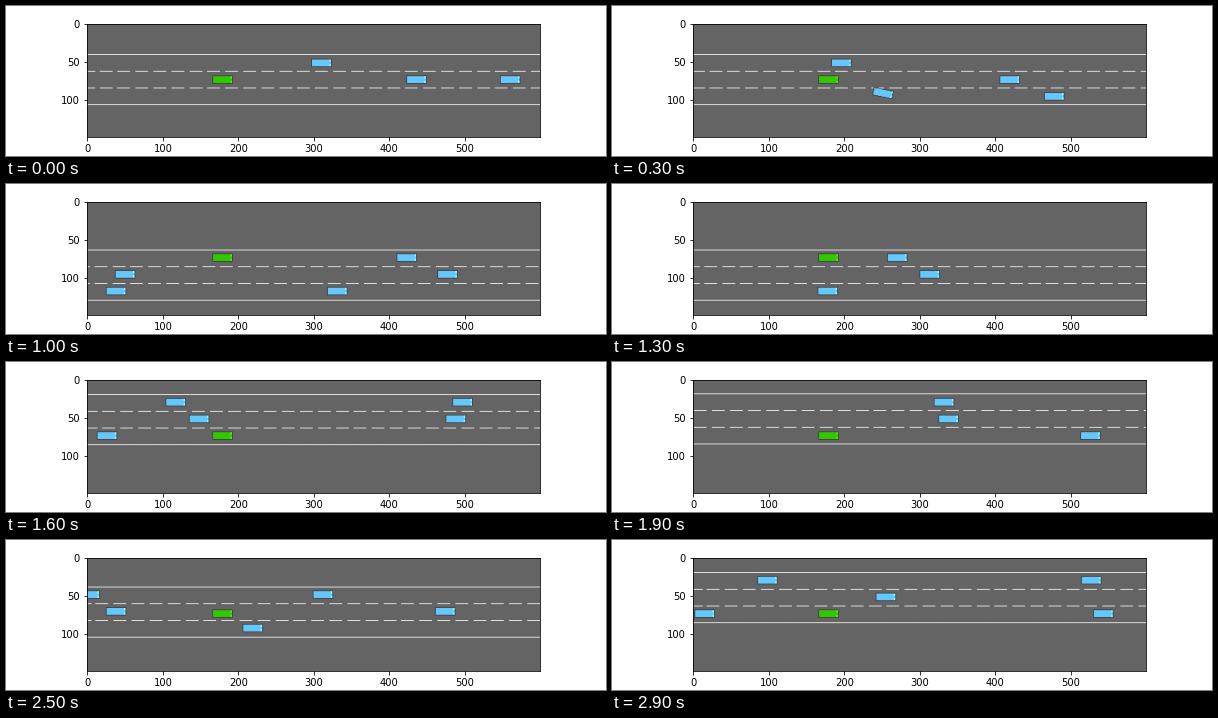
Write a matplotlib script that moves like this. It is 600 px wide and 150 px high and loops after 3000 ms.

```python
import numpy as np
import matplotlib.pyplot as plt
from matplotlib.animation import FuncAnimation

W, H, FRAMES, STEP_MS = 600, 150, 30, 100
SCALE = 5.5                      # road pixels per metre
LANE = 22                        # lane width in road pixels
DASH_GAP, DASH_LEN = 4.33 * SCALE, 16
EGO_X, EGO_Y, EGO_SPEED = 180, 75, 30
GREY, WHITE, EDGE = (100, 100, 100), (255, 255, 255), (60, 60, 60)
GREEN, BLUE = (50, 200, 0), (100, 200, 255)
YY, XX = np.mgrid[0:H, 0:W]

# The green car's lane changes: step and direction
TURNS = [(6, -1), (14, 1), (15, 1), (25, -1), (28, 1)]

# Per lane: step at which a car is passed, and its closing speed
TRAFFIC = [
    [(3.4, 43.6), (14.8, 51), (21.8, 54.9), (27.5, 53.4), (35.7, 52)],
    [(7.56, 52.7), (15.45, 54.7), (22.2, 50), (30.4, 54.8)],
    [(7.77, 62.8), (13, 50.9), (25.8, 51.1), (36, 52)],
]


def ego_lane(t):
    """Each lane change eases out, leaving 12 % of the way per step."""
    return 1 + sum(d * (1 - 0.12 ** (t - s + 1)) for s, d in TURNS if t >= s)


def car_x(passed, speed, t):
    """The last term is the green car still gaining speed at the start."""
    return EGO_X + speed * (passed - t) - 3 * SCALE * np.exp(-t / 0.6)


def paint_car(view, x, y, color, angle=0.0):
    dx, dy = XX - int(x), YY - int(y)
    u = np.rint(dx * np.cos(angle) - dy * np.sin(angle))
    v = np.rint(dx * np.sin(angle) + dy * np.cos(angle))
    body = (u >= -14) & (u <= 12) & (v >= -6) & (v <= 4)
    inner = (u > -14) & (u < 12) & (v > -6) & (v < 4)
    lamps = inner & (u >= 10) & ((v <= -3) | (v >= 1))
    view[body] = EDGE
    view[inner] = color
    view[lamps] = [min(int(c / 0.68), 255) for c in color]


def paint_road(view, row, t):
    view[[row, row + 3 * LANE]] = WHITE
    start = (17 - EGO_SPEED * SCALE * t) % DASH_GAP - DASH_GAP
    for x in np.arange(start, W, DASH_GAP):
        a, b = max(int(x), 0), max(int(x) + DASH_LEN + 1, 0)
        view[[row + LANE, row + 2 * LANE], a:b] = WHITE


def road_view(t):
    view = np.full((H, W, 3), GREY, np.uint8)
    top = 64.1 - 22.15 * ego_lane(t)
    first_lane = top + 11.25
    paint_road(view, int(top), t)

    for lane, cars in enumerate(TRAFFIC):
        for passed, speed in cars:
            paint_car(view, car_x(passed, speed, t),
                      first_lane + LANE * lane, BLUE)

    # One car swerves from the middle lane to the lowest and back
    swerve = np.pi * t / 8
    paint_car(view, car_x(4.07, 67.4, t),
              first_lane + LANE * (1 + np.sin(swerve) ** 2), BLUE,
              -0.28 * np.sin(2 * swerve))
    paint_car(view, EGO_X, EGO_Y, GREEN)
    return view


plt.rcParams["font.family"] = "DejaVu Sans"
fig, ax = plt.subplots(figsize=(W / 72, H / 72), dpi=72, facecolor="white")
fig.subplots_adjust(left=0.125, right=0.9, bottom=0.125, top=0.88)
picture = ax.imshow(road_view(0))
ax.set_xticks(range(0, W, 100))
ax.set_yticks(range(0, H, 50))


def update(i):
    picture.set_data(road_view(i))
    return [picture]


anim = FuncAnimation(fig, update, frames=FRAMES, interval=STEP_MS,
                     repeat=True, repeat_delay=0, blit=False)
plt.show()
```
